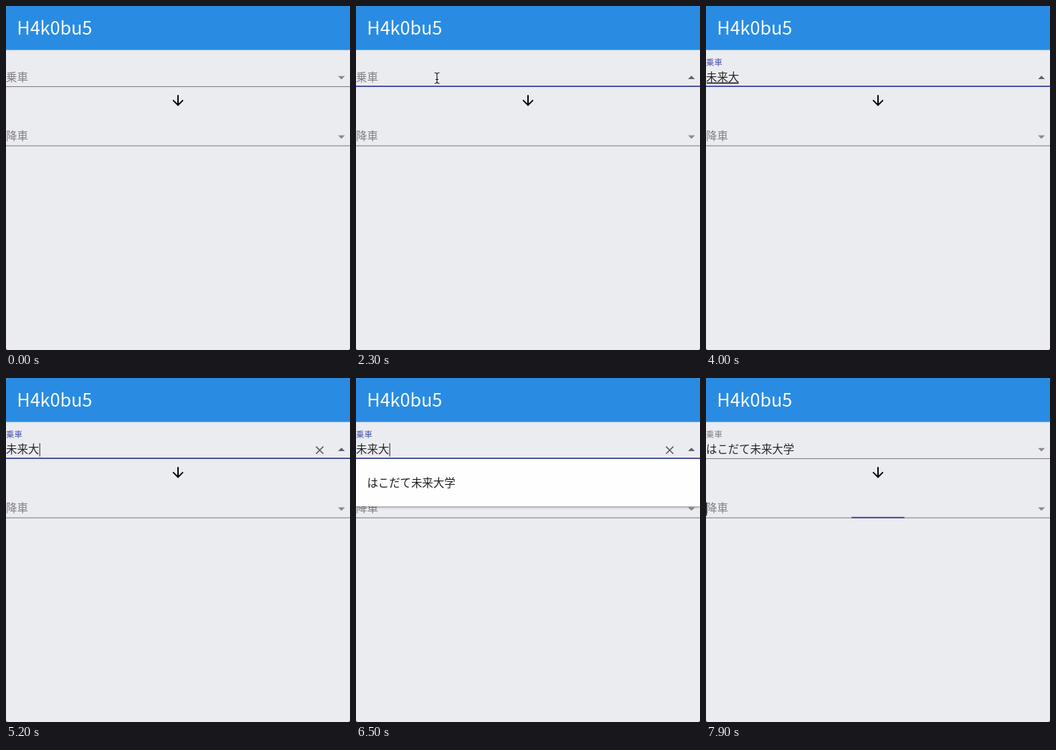
Write an HTML page that moves like this. It is 480 px wide and 480 px high and loops after 8 s.

```html
<!DOCTYPE html>
<html lang="ja">
<head>
<meta charset="utf-8">
<title>H4k0bu5</title>
<style>
  html, body { margin: 0; width: 100%; height: 100%; overflow: hidden; background: #55565a; }
  svg { display: block; width: 100vw; height: 100vh; }
  text { font-family: "Noto Sans CJK JP", "Noto Sans CJK", "Noto Sans", sans-serif; font-size: 15.4px; white-space: pre; }
  .small { font-size: 11.4px; }
  .hint { fill: #828284; }
  .value { fill: #27272a; }
  .line { fill: #7b7b7e; }
  .focus { fill: #3f469f; }
  .caret { fill: #202022; }
</style>
</head>
<body>
<svg viewBox="0 0 480 480">
  <defs>
    <clipPath id="win"><rect width="480" height="480" rx="3"/></clipPath>
    <filter id="shadow" x="-5%" y="-20%" width="110%" height="150%">
      <feDropShadow dx="0" dy="1.5" stdDeviation="1.5" flood-opacity=".35"/>
    </filter>
  </defs>
  <g clip-path="url(#win)">
    <rect width="480" height="480" fill="#ebecf0"/>
    <rect width="480" height="61.4" fill="#298ce2"/>
    <text x="15.3" y="39.6" fill="#fff" style="font-size:25.2px">H4k0bu5</text>
    <path transform="translate(228.5 120.5) scale(.96)"
      d="M20 12l-1.41-1.41L13 16.17V4h-2v12.17l-5.58-5.59L4 12l8 8 8-8z"/>

    <g transform="translate(0 82.6)">
      <text class="hint" x="0" y="104.8">降車</text>
      <rect class="line" y="112" width="480" height="1"/>
      <rect class="focus" id="line2" y="111.2" height="1.8"/>
      <path d="M463.3 97.8h9.6l-4.8 4.8z" fill="#88898b"/>
      <rect class="caret" id="caret2" x="0" y="91" width="1.2" height="18.5"/>
    </g>

    <text class="hint" id="hint" x="0" y="104.8">乗車</text>
    <text class="small" id="label" x="0" y="83.2">乗車</text>
    <text class="value" id="value" x="0" y="104.8"></text>
    <rect id="mark" x="1" fill="#27272a"/>
    <rect class="line" y="112" width="480" height="1"/>
    <rect class="focus" id="line1" y="111.2" height="1.8"/>
    <path id="down" d="M463.3 97.8h9.6l-4.8 4.8z" fill="#88898b"/>
    <path id="up" d="M463.3 102h9.6l-4.8-4.8z" fill="#626265"/>
    <path id="clear" d="M432.6 95.6l10.2 10.2m0-10.2l-10.2 10.2" fill="none" stroke="#5c5c5f" stroke-width="1.5"/>
    <rect class="caret" id="caret" y="91" width="1" height="18.5"/>

    <g id="popup">
      <rect y="113" width="480" height="66" fill="#fffeff" filter="url(#shadow)"/>
      <rect id="active" y="121" width="480" height="50" fill="#000" opacity=".06"/>
      <text x="15.4" y="152.4" fill="#1c1c1f">はこだて未来大学</text>
    </g>

    <path id="arrow" d="M0 0v14.5l3.4-3.2 2.2 5 2.3-1-2.2-4.9h4.7z" stroke="#fff" stroke-width="1"/>
    <g id="beam" fill="none">
      <path id="stem" d="M-3.5-7.5Q0-7.5 0-5Q0-7.5 3.5-7.5M0-5V5M-3.5 7.5Q0 7.5 0 5Q0 7.5 3.5 7.5M-2 2H2"
        stroke="#fff" stroke-width="2.6"/>
      <path d="M-3.5-7.5Q0-7.5 0-5Q0-7.5 3.5-7.5M0-5V5M-3.5 7.5Q0 7.5 0 5Q0 7.5 3.5 7.5M-2 2H2"
        stroke="#111" stroke-width="1.2"/>
    </g>
  </g>
</svg>
<script>
const LOOP = 8000, STEP = 100, EM = 15.4;
const CLICK = 1450, TYPE = 3200, COMMIT = 4200, OPEN = 6500, HIGHLIGHT = 7000, PICK = 7400, TAB = 7888;

// [start time, input text]
const typing = [
  [0, ''], [3200, 'm'], [3300, 'み'], [3500, 'みr'], [3600, 'みら'], [3700, 'みらい'],
  [3800, 'みらいd'], [3900, 'みらいだい'], [4000, '未来大'], [PICK, 'はこだて未来大学']
];
// [start time, caret visible]
const blink = [
  [0, 0], [1500, 1], [2000, 0], [2500, 1], [3000, 0], [3200, 1], [4000, 0], [COMMIT, 1],
  [4700, 0], [5200, 1], [5700, 0], [6200, 1], [6700, 0], [7200, 1], [7900, 0]
];

const $ = id => document.getElementById(id);
const at = (steps, t) => steps.filter(s => s[0] <= t).pop()[1];
const show = (id, on) => $(id).style.display = on ? '' : 'none';
const set = (id, attrs) => { for (const k in attrs) $(id).setAttribute(k, attrs[k]); };
const clamp = x => Math.min(1, Math.max(0, x));
const textWidth = s => [...s].reduce((w, c) => w + (c < '\x7f' ? (c === 'm' ? .93 : .5) : 1) * EM, 0);

function growLine(id, t, start) {
  const w = 480 * (1 - (1 - clamp((t - start) / 200)) ** 2.7);
  set(id, { x: 240 - w / 2, width: w });
}

function pointer(t) {
  const p = clamp((t - 100) / 1000);
  const e = p * p * (3 - 2 * p);
  const x = 474 - 361 * e, y = 402 - 301.5 * e;
  const inField = y < 112, visible = t >= 100 && t < TYPE;
  show('arrow', visible && !inField);
  show('beam', visible && inField);
  set(inField ? 'beam' : 'arrow', { transform: `translate(${x} ${y})` });
}

function render(t) {
  const text = at(typing, t), width = textWidth(text);
  const focused = t >= CLICK && t < TAB;
  const open = t >= CLICK && t < PICK;
  const converted = t >= 4000;

  $('value').textContent = text;
  show('hint', !text);
  show('label', text);
  set('label', { fill: focused ? '#4a55b0' : '#828284' });

  show('mark', text && t < COMMIT);
  set('mark', { y: converted ? 106.6 : 107, width: Math.max(0, width - 1.5), height: converted ? 1.8 : 1 });

  show('caret', at(blink, t));
  set('caret', { x: text ? width + .4 : 0 });

  show('line1', focused);
  growLine('line1', t, CLICK);
  show('up', open);
  show('down', !open);
  show('clear', t >= COMMIT && focused);

  show('popup', t >= OPEN && t < PICK);
  show('active', t >= HIGHLIGHT);

  growLine('line2', t, TAB);
  show('caret2', t >= TAB);
  pointer(t);
}

const begin = performance.now();
function tick(now) {
  const t = Math.max(0, now - begin) % LOOP;
  render(Math.floor(t / STEP) * STEP);
  requestAnimationFrame(tick);
}
render(0);
requestAnimationFrame(tick);
</script>
</body>
</html>
```
